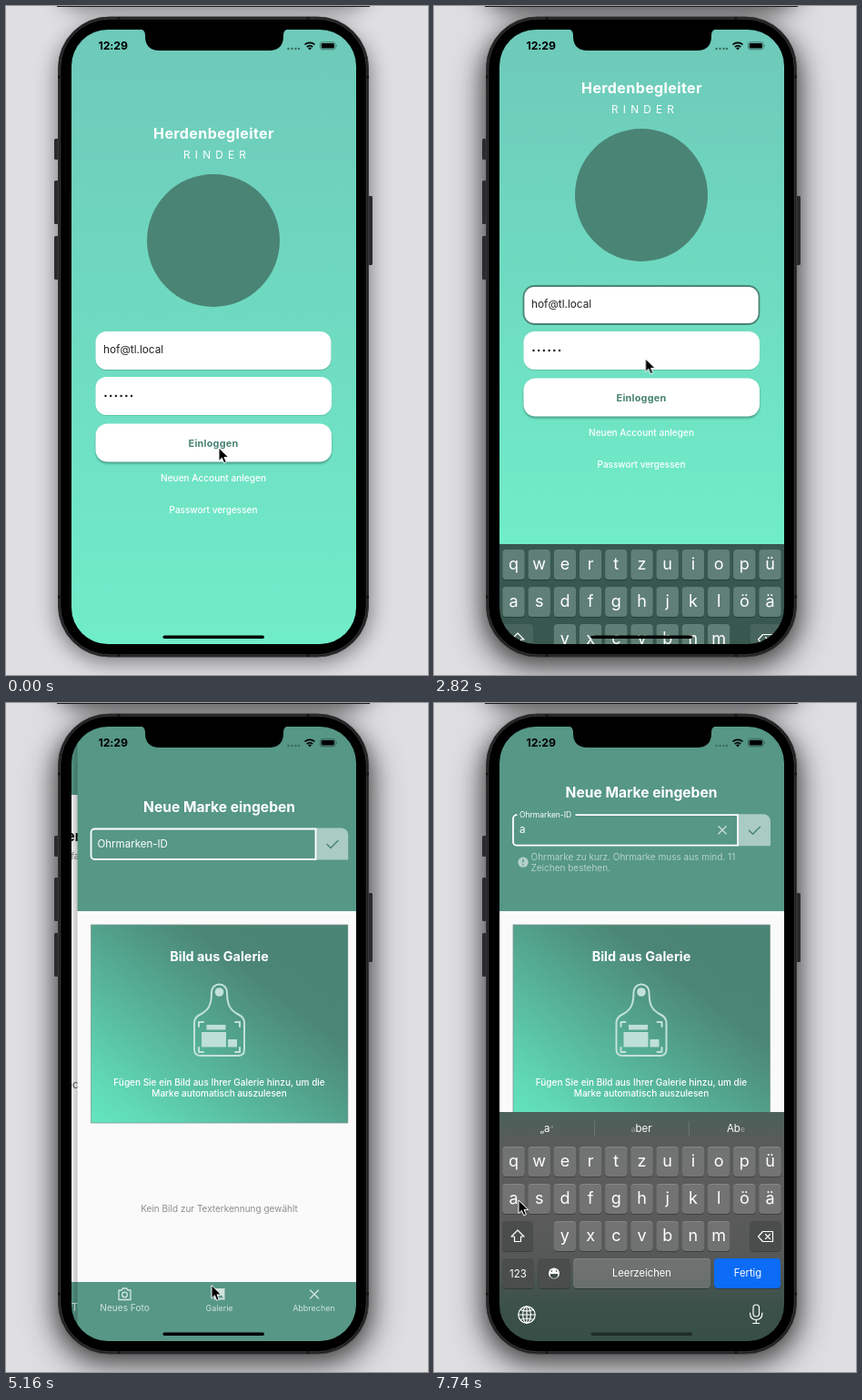
Write an HTML page that moves like this. It is 464x736 px and loops after 8000 ms.

```html
<!DOCTYPE html>
<html lang="de">
<head>
<meta charset="utf-8">
<style>
html, body { margin: 0; width: 100%; height: 100%; overflow: hidden; background: #dfdfe2; }
svg { display: block; width: 464px; height: 736px; font-family: Inter, Roboto, sans-serif; }
.mid { text-anchor: middle; }
.bold { font-weight: 700; }
.med { font-weight: 500; }
.line { fill: none; stroke-linecap: round; stroke-linejoin: round; }
.soft { filter: blur(11px); }
.deep { filter: blur(18px); }
</style>
</head>
<body>
<svg viewBox="0 0 464 736">
<defs>
  <clipPath id="screen"><rect x="72" y="26" width="313" height="676" rx="40"/></clipPath>
  <linearGradient id="mint" x2="0" y2="1"><stop stop-color="#6ec9b9"/><stop offset="1" stop-color="#70edc9"/></linearGradient>
  <linearGradient id="cardFill" x1="0" y1="1" x2="1" y2="0">
    <stop stop-color="#63e6c0"/><stop offset=".12" stop-color="#60d9b7"/><stop offset=".7" stop-color="#4b8575"/><stop offset="1" stop-color="#4a8474"/>
  </linearGradient>
  <linearGradient id="greyBoard" x2="0" y2="1">
    <stop stop-color="#4b615a"/><stop offset=".12" stop-color="#575b5a"/><stop offset=".3" stop-color="#5c5c5c"/>
    <stop offset=".62" stop-color="#575958"/><stop offset=".85" stop-color="#3b5149"/><stop offset="1" stop-color="#374f47"/>
  </linearGradient>
  <linearGradient id="edge"><stop stop-color="#000" stop-opacity="0"/><stop offset="1" stop-color="#000" stop-opacity=".22"/></linearGradient>
</defs>

<rect width="464" height="736" fill="#dfdfe2"/>
<g id="deepShadow" class="deep" opacity="0">
  <rect x="52" y="24" width="352" height="708" rx="58" fill-opacity=".42"/>
  <rect x="52" y="-90" width="352" height="94" rx="40" fill-opacity=".42"/>
</g>
<g class="soft">
  <rect x="55" y="20" width="346" height="702" rx="58" fill-opacity=".45"/>
  <rect x="55" y="-90" width="346" height="94" rx="30" fill-opacity=".45"/>
</g>
<rect x="56" y="-20" width="344" height="21" fill="#1b1b1d"/>

<g fill="#2b2b2d">
  <rect x="53" y="146" width="6" height="23" rx="1.5"/>
  <rect x="53" y="192" width="6" height="48" rx="1.5"/>
  <rect x="53" y="253" width="6" height="48" rx="1.5"/>
  <rect x="397" y="209" width="6" height="76" rx="1.5"/>
</g>
<rect x="57.5" y="12" width="341" height="704" rx="56" fill="#1d1d1f" stroke="#39393b"/>
<rect x="59.7" y="14.2" width="336.6" height="699.6" rx="54" stroke="#48484a" stroke-width=".8"/>
<path d="M57 78h4M395 78h4M57 650h4M395 650h4M124 12v3M332 12v3M124 713v3M332 713v3" stroke="#161617" stroke-width="3"/>

<g clip-path="url(#screen)">
  <g id="login">
    <rect x="72" y="26" width="313" height="676" fill="#6ecab9"/>
    <g transform="translate(0 26)"><rect id="sky" x="72" width="313" height="676" fill="url(#mint)"/></g>
    <g id="form" class="mid" fill="#fff">
      <text x="228.5" y="146" font-size="16" class="bold" letter-spacing=".4">Herdenbegleiter</text>
      <text x="232" y="167.5" font-size="11.8" letter-spacing="5.2">RINDER</text>
      <circle cx="228" cy="258" r="73" fill="#4a8475"/>
      <rect x="98.5" y="359" width="259.5" height="42" rx="12" fill="#2c6d5b" opacity=".3"/>
      <rect id="mail" x="98.5" y="358" width="259" height="42" rx="12" stroke="#4a8474" stroke-width="0"/>
      <text x="107" y="382" font-size="11.8" fill="#222" style="text-anchor:start">hof@tl.local</text>
      <rect id="caret" x="173.8" y="370" width="1.4" height="16" fill="#4a8474"/>
      <rect x="98.5" y="409" width="259.5" height="42" rx="12" fill="#2c6d5b" opacity=".25"/>
      <rect x="98.5" y="408" width="259.5" height="42" rx="12"/>
      <g id="dots" fill="#222"></g>
      <rect x="98.5" y="461.5" width="259.5" height="42" rx="13" fill="#235a4b" opacity=".5" style="filter:blur(1px)"/>
      <rect x="98.5" y="459.5" width="259.5" height="42" rx="13"/>
      <text x="228" y="484.5" font-size="10.9" class="bold" letter-spacing=".2" fill="#4a8474">Einloggen</text>
      <text x="228" y="523" font-size="10.1" class="med">Neuen Account anlegen</text>
      <text x="228" y="558" font-size="10" class="med">Passwort vergessen</text>
    </g>
    <g id="board1"></g>
  </g>

  <g id="app">
    <g id="home" class="mid">
      <rect x="72" y="26" width="313" height="676" fill="#fafafa"/>
      <path d="M72 26h313v75H72zM72 637h313v65H72z" fill="#569785"/>
      <text x="228" y="84" font-size="15.5" class="bold" fill="#fff">Meine Tiere</text>
      <text x="228" y="152" font-size="15" class="bold">Herde im Transport</text>
      <text x="228" y="172" font-size="10.2" fill="#777">Erfasste Tiere im Überblick</text>
      <text id="hint" x="228" y="424" font-size="12" fill="#555">Noch keine Tiere erfasst</text>
      <path d="M228 644v12m-6-6h12" stroke="#d5e6e1" stroke-width="1.6"/>
      <text x="228" y="669" font-size="11.8" fill="#d5e6e1">Tiermarke erfassen</text>
    </g>

    <g id="page">
      <rect x="64" y="26" width="8" height="676" fill="url(#edge)"/>
      <rect x="72" y="26" width="313" height="676" fill="#fafafa"/>
      <path d="M72 26h313v203H72zM72 637h313v65H72z" fill="#569785"/>
      <g id="head" fill="#fff">
        <text x="228" y="119.5" font-size="15.6" class="bold mid">Neue Marke eingeben</text>
        <path d="M334 137.5h28a8 8 0 0 1 8 8v27h-36z" fill="#a9cbc1"/>
        <path d="M334 138.5H91a4 4 0 0 0-4 4v25.5a4 4 0 0 0 4 4h243z" fill="none" stroke="#fff" stroke-width="1.8"/>
        <path d="M346.5 155.5l4 4 8-8" class="line" stroke="#4a8474" stroke-width="1.5"/>
        <rect id="gap" x="91.5" y="136.5" width="64" height="4" fill="#569785"/>
        <g transform="translate(94 159.4)"><text id="label" font-size="11.5">Ohrmarken-ID</text></g>
        <g id="typed">
          <text x="94" y="158.5" font-size="11.5">a</text>
          <path d="M312.5 150.5l9 9m0-9l-9 9" stroke="#c9dfd8" stroke-width="1.4"/>
        </g>
        <g id="error" fill="#b5d2c9">
          <circle cx="98" cy="190.5" r="5.6"/>
          <path d="M98 187v4m0 1.5v1.5" stroke="#569785" stroke-width="1.4"/>
          <text x="106.5" y="188" font-size="10">Ohrmarke zu kurz. Ohrmarke muss aus mind. 11</text>
          <text x="106.5" y="200.3" font-size="10">Zeichen bestehen.</text>
        </g>
      </g>
      <rect x="87" y="244" width="282.5" height="218" fill="url(#cardFill)" stroke="#7f9a92" stroke-width=".8"/>
      <g class="mid" fill="#fff">
        <text x="228" y="283.5" font-size="14.4" class="bold">Bild aus Galerie</text>
        <text x="228" y="421" font-size="10" class="med">Fügen Sie ein Bild aus Ihrer Galerie hinzu, um die</text>
        <text x="228" y="433.3" font-size="10" class="med">Marke automatisch auszulesen</text>
        <text x="228" y="560" font-size="10" fill="#8e8e8e">Kein Bild zur Texterkennung gewählt</text>
      </g>
      <g class="line" stroke="#c2e2d8" stroke-width="2">
        <path d="M219.5 318a8.5 8.5 0 0 1 17 0c0 14 3 20 13 25q6 3 6 9v29q0 7-7 7h-41q-7 0-7-7v-29q0-6 6-9c10-5 13-11 13-25z"/>
        <path d="M205.5 356v-5h5m35 0h5v5m0 23v5h-5m-35 0h-5v-5"/>
      </g>
      <path d="M214 354h21v5.5h-21zM208.5 362h27v16.5h-27zM237.5 370h10v8.5h-10z" fill="#bfe0d6"/>
      <circle cx="228" cy="318" r="4.8" fill="#c2e2d8"/>
      <g class="mid" fill="#cfe3dc">
        <text x="124" y="669" font-size="10.1">Neues Foto</text>
        <text x="228" y="669" font-size="9">Galerie</text>
        <text x="332" y="669" font-size="9">Abbrechen</text>
        <path d="M222 644h12v12.5h-12zM223.5 654.5h9l-3-4-2 2.5-1.5-2z" fill-rule="evenodd"/>
        <g class="line" stroke="#d5e6e1" stroke-width="1.3">
          <path d="M117.5 646h3l1.5-2h4l1.5 2h3v10.500h-13z"/><circle cx="124" cy="651" r="2.8"/>
          <path d="M328 646l9 9m0-9l-9 9"/>
        </g>
      </g>
      <g id="board2"></g>
    </g>
  </g>

  <text x="101.5" y="48" font-size="12.3" class="bold" letter-spacing="-.1">12:29</text>
  <g fill="#3b6b5e"><circle cx="310.5" cy="47" r="1.2"/><circle cx="314.500" cy="47" r="1.2"/><circle cx="318.5" cy="47" r="1.2"/><circle cx="322" cy="47" r="1.2"/></g>
  <path d="M328.5 42.5a8 8 0 0 1 11 0M330.8 45a4.8 4.8 0 0 1 6.4 0" fill="none" stroke="#000" stroke-width="1.7"/>
  <path d="M334 48.5l-2-2.2a3 3 0 0 1 4 0z"/>
  <rect x="345.5" y="39.8" width="16.5" height="8" rx="2.3" fill="none" stroke="#000" stroke-opacity=".5" stroke-width=".8"/>
  <rect x="346.8" y="41" width="14" height="5.6" rx="1.3"/>
  <path d="M363 42.3q1.5 1.5 0 3z" opacity=".5"/>
  <rect id="bar" x="172.5" y="692.5" width="111.5" height="3.6" rx="1.8"/>

  <g id="wait">
    <rect x="72" y="26" width="313" height="676"/>
    <path d="M240.7 368.6a13.5 13.5 0 1 1-8-17.3" fill="none" stroke="#5a9a87" stroke-width="3"/>
    <rect x="172.5" y="692.5" width="111.5" height="3.6" rx="1.8" fill="#555"/>
  </g>
</g>
<path d="M145 25q8 0 8 7v1q0 16 16 16h120q16 0 16-16v-1q0-7 8-7z"/>
<g id="pointer"><path d="M0 0v14.5l3.4-3.2 2.3 5.4 2.6-1.1-2.3-5.2h4.7z" stroke="#fff" stroke-width="1"/></g>
</svg>

<script>
const LOOP = 8000;
const $ = id => document.getElementById(id);

// steps: [ms, value]; two steps at one time make a hard cut
function track(id, prop, steps, easing = 'linear') {
  const all = [...steps];
  if (all[0][0] > 0) all.unshift([0, all[0][1]]);
  if (all.at(-1)[0] < LOOP) all.push([LOOP, all.at(-1)[1]]);
  $(id).animate(all.map(([ms, v]) => ({ offset: ms / LOOP, [prop]: v, easing })),
    { duration: LOOP, iterations: Infinity });
}
// times alternate between appearing and vanishing
function show(id, ...times) {
  const steps = times.map((ms, i) => [ms, 1 - i % 2]);
  track(id, 'opacity', times[0] > 0 ? [[0, 0], ...steps] : steps, 'step-end');
}
const slide = (id, axis, steps) =>
  track(id, 'transform', steps.map(([ms, v]) => [ms, `translate${axis}(${v}px)`]));

const label = (x, y, size, text) =>
  `<text class="mid" x="${x}" y="${y}" font-size="${size}" fill="#fff">${text}</text>`;

function board({ top, back, key, dark, mail }) {
  const cap = (x, y, w, fill) =>
    `<rect x="${x}" y="${y + 1}" width="${w}" height="33" rx="4" opacity=".3"/>` +
    `<rect x="${x}" y="${y}" width="${w}" height="33" rx="4" fill="${fill}"/>`;
  let out = `<rect x="72" y="${top}" width="313" height="${702 - top}" fill="${back}"/>`;
  ['qwertzuiopü', 'asdfghjklöä', 'yxcvbnm'].forEach((row, r) => {
    [...row].forEach((ch, i) => {
      const x = 87.5 + 28.2 * (i + (r === 2 ? 2 : 0)), y = 488 + 41 * r;
      out += cap(x - 12.2, y, 24.4, key) + label(x, y + 22, 18, ch);
    });
  });
  out += cap(75, 570, 34, dark) + cap(347.5, 570, 34, dark) + cap(75, 611, 35, dark) + cap(114.5, 611, 35, dark);
  out += cap(153, 611, mail ? 74.5 : 151, key) + label(mail ? 190 : 228.5, 630.5, 11.2, 'Leerzeichen');
  if (mail) out += cap(231, 611, 35, key) + cap(269.5, 611, 35, key) + label(248.5, 632, 14, '@') + label(287, 631, 13, '.');
  out += cap(308, 611, 73, '#0c6cf5') + label(345, 630.5, 11.2, 'Fertig') + label(92.5, 631.5, 11.5, '123');
  out += `<circle cx="132" cy="627.5" r="6" fill="#fff"/>
    <path d="M128 628.5h8a4 4 0 0 1-8 0zM129.5 624v2M134.5 624v2" fill="#3c4b47" stroke="#3c4b47" stroke-width=".9"/>
    <g class="line" stroke="#fff" stroke-width="1.2">
      <path d="M92 580l7 7h-3.5v5.5h-7V587H85z"/>
      <path d="M356.5 587l5-5.5h11v11h-11zM364.5 584.5l5 5m0-5l-5 5"/>
      <circle cx="102" cy="673" r="9.2"/><ellipse cx="102" cy="673" rx="4.3" ry="9.2"/>
      <path d="M102 664v18M93 673h18M95 667.5q7 3 14 0M95 678.5q7-3 14 0"/>
      ${mail ? '' : '<rect x="351" y="662" width="6.5" height="13" rx="3.2"/><path d="M347.5 671q0 7.5 6.7 7.5t6.7-7.5M354.2 678.5v4m-3.5 0h7"/>'}
    </g>`;
  return out;
}

$('dots').innerHTML = Array.from({ length: 6 }, (_, i) =>
  `<circle cx="${109.5 + 5.7 * i}" cy="429" r="1.25"/>`).join('');
$('board1').innerHTML = board({ top: 482, back: '#37574f', key: '#5f7f77', dark: '#48655d', mail: true });
const faint = s => `<tspan font-size="9" fill-opacity=".4">${s}</tspan>`;
const words = (id, list) =>
  `<g id="${id}">${list.map((w, i) => label(124 + 104 * i, 472, 11.5, w)).join('')}</g>`;
$('board2').innerHTML =
  board({ top: 450, back: 'url(#greyBoard)', key: 'rgba(255,255,255,.27)', dark: '#4a4d4c' }) +
  '<path d="M176.5 460v16M280.5 460v16" stroke="#fff" stroke-opacity=".15"/>' +
  words('words1', ['Ich', 'Die', 'Das']) +
  words('words2', ['„a' + faint('“'), faint('a') + 'ber', 'Ab' + faint('e')]);

// Login
track('deepShadow', 'opacity', [[480, 0], [600, 1]]);
slide('form', 'Y', [[600, 0], [720, -104], [2820, -104], [2820, -50], [2880, -50], [2880, 0]]);
track('sky', 'transform', [[600, 1], [720, .675], [2820, .675], [2820, .84], [2880, .84], [2880, 1]]
  .map(([ms, s]) => [ms, `scaleY(${s})`]));
slide('board1', 'Y', [[700, 230], [780, 194], [1020, 194], [1020, 45], [1080, 12], [1140, 0],
  [2820, 0], [2820, 110], [2880, 110], [2880, 230]]);
track('mail', 'strokeWidth', [[600, '0px'], [660, '1px'], [1020, '1px'], [1140, '1.8px'], [2820, '1.8px'], [2880, '0px']]);
show('caret', 600, 1320, 1620, 1920);
show('login', 0, 3300);
show('wait', 3300, 3360);

// Overview and tag entry
show('app', 3360);
show('hint', 3960);
const push = [[4740, 1], [4800, .86], [4860, .48], [4920, .24], [5040, .077], [5160, .021], [5280, 0]];
slide('page', 'X', push.map(([ms, p]) => [ms, 313 * p]));
slide('home', 'X', push.map(([ms, p]) => [ms, -104 * (1 - p)]));
track('label', 'transform', [[6360, 'translateY(0px) scale(1)'], [6480, 'translateY(-17.7px) scale(.74)']]);
track('gap', 'opacity', [[6360, 0], [6480, 1]]);
slide('board2', 'Y', [[6600, 260], [6600, 150], [6660, 45], [6720, 0]]);
show('typed', 7500);
slide('head', 'Y', [[7560, 0], [7680, -15.3]]);
track('error', 'opacity', [[7560, 0], [7740, 1]]);
show('words1', 6600, 7680);
show('words2', 7680);
track('bar', 'opacity', [[1020, 1], [1140, .5], [2820, .5], [2820, 1], [6600, 1], [6720, .45]]);

track('pointer', 'transform', [
  [60, 234, 486], [420, 216, 392], [1320, 216, 392], [2040, 232.5, 388],
  [4440, 232.5, 388], [4700, 226, 640.5], [5760, 226, 640.5], [6240, 173, 160],
  [6900, 173, 160], [7440, 93, 547]
].map(([ms, x, y]) => [ms, `translate(${x}px, ${y}px)`]), 'ease-in-out');
</script>
</body>
</html>
```
